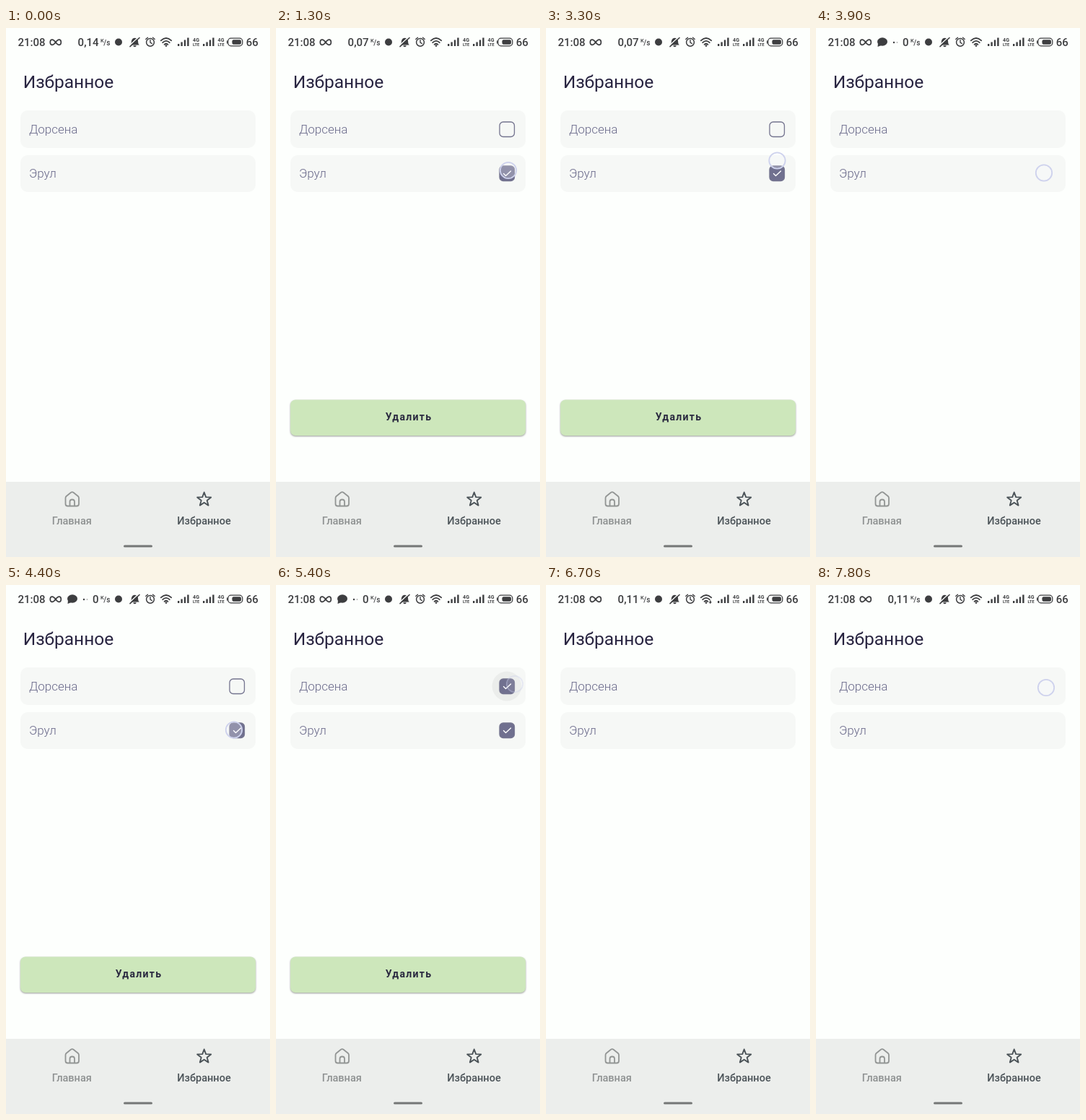
An HTML page for the animation above (8 s loop, 366x732 px).

```html
<!DOCTYPE html>
<html lang="ru">
<head>
<meta charset="utf-8">
<style>
  html, body { margin: 0; width: 100%; height: 100%; overflow: hidden; background: #fdfffd; }
  svg { display: block; width: 100%; height: 100%; font-family: Roboto, sans-serif; }
  .line { fill: none; stroke-linecap: round; stroke-linejoin: round; }
  .status { fill: #3d3e40; font-weight: 500; font-size: 15px; }
  .status .line { stroke: #3d3e40; fill: none; }
  .name { font-size: 17px; font-weight: 300; fill: #69698a; }
  .tab { font-size: 14.5px; font-weight: 500; text-anchor: middle; }
  .button { filter: drop-shadow(0 1.5px 1px #0006); }
</style>
</head>
<body>
<svg viewBox="0 0 366 732">
  <defs>
    <g id="bars">
      <path d="M0 22h2.4v3H0zM4.4 19.5h2.4V25H4.4zM8.8 16.5h2.4V25H8.8zM13.2 13.5h2.4V25h-2.4z"/>
    </g>
    <g id="network" font-size="7" font-weight="700" text-anchor="middle">
      <text y="18.8">4G</text>
      <text y="25.2" font-size="5.6">LTE</text>
    </g>
  </defs>

  <g class="status">
    <text x="16.5" y="25">21:08</text>
    <path class="line" stroke-width="1.7" d="M68.800 19.800C66.300 16.500 64.800 16 63.600 16.200C60.500 16.700 60.500 22.900 63.600 23.400C64.800 23.600 66.300 23.100 68.800 19.800S72.800 16 74 16.200C77.100 16.700 77.100 22.900 74 23.400C72.800 23.600 71.300 23.100 68.800 19.800"/>
    <g id="message">
      <ellipse cx="92" cy="19" rx="7" ry="5.8"/>
      <path d="M86 21l-.5 5 5-2z"/>
      <circle cx="108" cy="20" r="1.2"/>
      <circle cx="112.5" cy="20" r=".8" opacity=".6"/>
    </g>
    <text id="speed" x="128.5" y="25" text-anchor="end"></text>
    <text x="131" y="19.5" font-size="7.5">K</text>
    <text x="135.3" y="24" font-size="10">/s</text>
    <circle cx="156" cy="19.5" r="5"/>

    <path d="M172 23.500c2.300-1.500 1.500-4.500 2.200-6.500 1.200-4.500 7.400-4.500 8.600 0 .7 2-.1 5 2.200 6.500zM176.300 24.300h4.400a2.200 2 0 0 1-4.400 0z"/>
    <path class="line" style="stroke:#fdfffd" stroke-width="1.400" d="M171.500 24L184 12.200"/>
    <path class="line" stroke-width="1.600" d="M172 25.700L185 13.500"/>

    <circle class="line" cx="200" cy="19.800" r="5.400" stroke-width="1.500"/>
    <path class="line" stroke-width="1.400" d="M200 16.800v3.400l2.300 1.200M193.800 15.500l2.700-2.300M206.200 15.500l-2.700-2.300"/>

    <path class="line" stroke-width="1.800" d="M214.800 17.400Q222 10.600 229.200 17.400M217.200 20.200Q222 15.600 226.800 20.200M219.600 22.800Q222 20.600 224.400 22.800"/>
    <circle cx="222" cy="24.600" r="1.300"/>
    <path id="download" d="M227 21.500h1.600v2h1.400l-2.200 2.500-2.200-2.500H227z"/>

    <use href="#bars" x="238"/>
    <use href="#network" x="263.5"/>
    <use href="#bars" x="273"/>
    <use href="#network" x="298"/>
    <rect class="line" x="307.8" y="14.2" width="20" height="10.6" rx="4" stroke-width="1.3"/>
    <rect x="313.5" y="16.2" width="12.5" height="6.6" rx="2"/>
    <path d="M306 17.500h1.200v4H306z"/>
    <text x="332.7" y="25">66</text>
  </g>

  <text x="23.7" y="82.5" font-size="24.5" fill="#292541">Избранное</text>

  <g id="cards"></g>

  <g id="delete">
    <rect class="button" x="20" y="514.5" width="326" height="49.5" rx="7" fill="#cde7bb"/>
    <text x="184" y="543" text-anchor="middle" font-size="14" font-weight="700" letter-spacing="1.3" fill="#29283f">Удалить</text>
  </g>

  <rect y="628" width="366" height="104" fill="#eceeec"/>
  <path class="line" stroke="#929594" stroke-width="1.8" d="M82.500 650.500Q82.500 649 83.500 648L90 642.700Q91.800 641.500 93.500 642.700L100 648Q101 649 101 650.500V658.500Q101 661.500 98 661.500H85.500Q82.500 661.500 82.500 658.500ZM88.500 661.500V655.500Q88.500 652.500 91.750 652.500T95 655.500V661.500"/>
  <path id="star" class="line" stroke="#4b5358" stroke-width="1.9"/>
  <text class="tab" x="91.3" y="687" fill="#8e9191">Главная</text>
  <text class="tab" x="274.5" y="687" fill="#4b5358">Избранное</text>
  <rect x="163" y="715.5" width="40" height="3" rx="1.5" fill="#757776"/>

  <circle id="touch" r="11.2" fill="#f6f7ff" fill-opacity=".25" stroke="#ced2ed" stroke-width="1.8"/>
</svg>
<script>
const DURATION = 8000, STEP = 100;
const byId = id => document.getElementById(id);

// All spans are [start, end) in ms.
const selecting = [[1300, 3500], [4400, 6600]];
const cards = [
  { name: 'Дорсена', top: 114, height: 52, middle: 140,
    checked: [[2200, 2900], [5300, 6600]],
    ripples: [[2200, 2600], [2800, 3200], [5300, 5700], [6500, 6800]] },
  { name: 'Эрул', top: 176, height: 51, middle: 201,
    checked: [[1300, 3500], [4400, 6100]],
    ripples: [[6000, 6400]] }
];
// Each touch is [start, end, x, y].
const touches = [
  [900, 1800, 322, 197], [2100, 2400, 319.5, 142.5], [2700, 3100, 322, 141],
  [3300, 3600, 320.5, 183.5], [3900, 4800, 316, 200.5], [5200, 5500, 331, 137],
  [5900, 6200, 326, 201], [6400, 6700, 324.5, 133], [7800, 9000, 319, 142]
];
const speeds = [[0, '0,14'], [600, '0,07'], [3600, '0'], [6700, '0,11']];

const find = (spans, t) => spans.find(([start, end]) => t >= start && t < end);
const clamp = v => Math.max(0, Math.min(1, v));
const show = (el, on) => el.style.display = on ? '' : 'none';

byId('cards').innerHTML = cards.map(c => `
  <rect x="20" y="${c.top}" width="326" height="${c.height}" rx="10" fill="#f6f8f6"/>
  <text class="name" x="32" y="${c.middle + 6}">${c.name}</text>
  <g class="box" transform="translate(320 ${c.middle})">
    <circle class="ripple" r="20.5"/>
    <rect class="frame" x="-10" y="-10" width="20.5" height="20.5" rx="5" stroke="#74748f" stroke-width="1.3"/>
    <path class="line tick" stroke="#fff" stroke-width="1.4" d="M-4.500 .500l3 3 7-6.500"/>
  </g>`).join('');

document.querySelectorAll('.box').forEach((box, i) => Object.assign(cards[i], {
  box, ripple: box.querySelector('.ripple'),
  frame: box.querySelector('.frame'), tick: box.querySelector('.tick')
}));

const starPoints = Array.from({ length: 10 }, (_, i) => {
  const r = i % 2 ? 4.2 : 10, a = i * Math.PI / 5;
  return `${274.7 + r * Math.sin(a)} ${652.5 - r * Math.cos(a)}`;
});
byId('star').setAttribute('d', `M${starPoints.join('L')}Z`);

function render(t) {
  const active = !!find(selecting, t);
  show(byId('delete'), active);
  for (const c of cards) {
    const checked = !!find(c.checked, t), ripple = find(c.ripples, t);
    show(c.box, active);
    show(c.tick, checked);
    c.frame.setAttribute('fill', checked ? '#70708f' : 'none');
    const strength = ripple ? clamp(Math.min((t - ripple[0] + 100) / 200, (ripple[1] - t) / 200)) : 0;
    c.ripple.setAttribute('opacity', strength * .045);
  }

  const touch = find(touches, t), circle = byId('touch');
  show(circle, touch);
  if (touch) {
    const [, end, x, y] = touch;
    circle.setAttribute('cx', x);
    circle.setAttribute('cy', y);
    circle.setAttribute('opacity', clamp((end - t) / 250));
  }

  byId('speed').textContent = speeds.filter(([start]) => t >= start).pop()[1];
  show(byId('message'), t >= 3600 && t < 6700);
  show(byId('download'), t >= 6200 && t < 7500);
}

const began = performance.now();
function frame() {
  const t = (performance.now() - began) % DURATION;
  render(Math.floor(t / STEP) * STEP);
  requestAnimationFrame(frame);
}
frame();
</script>
</body>
</html>
```
